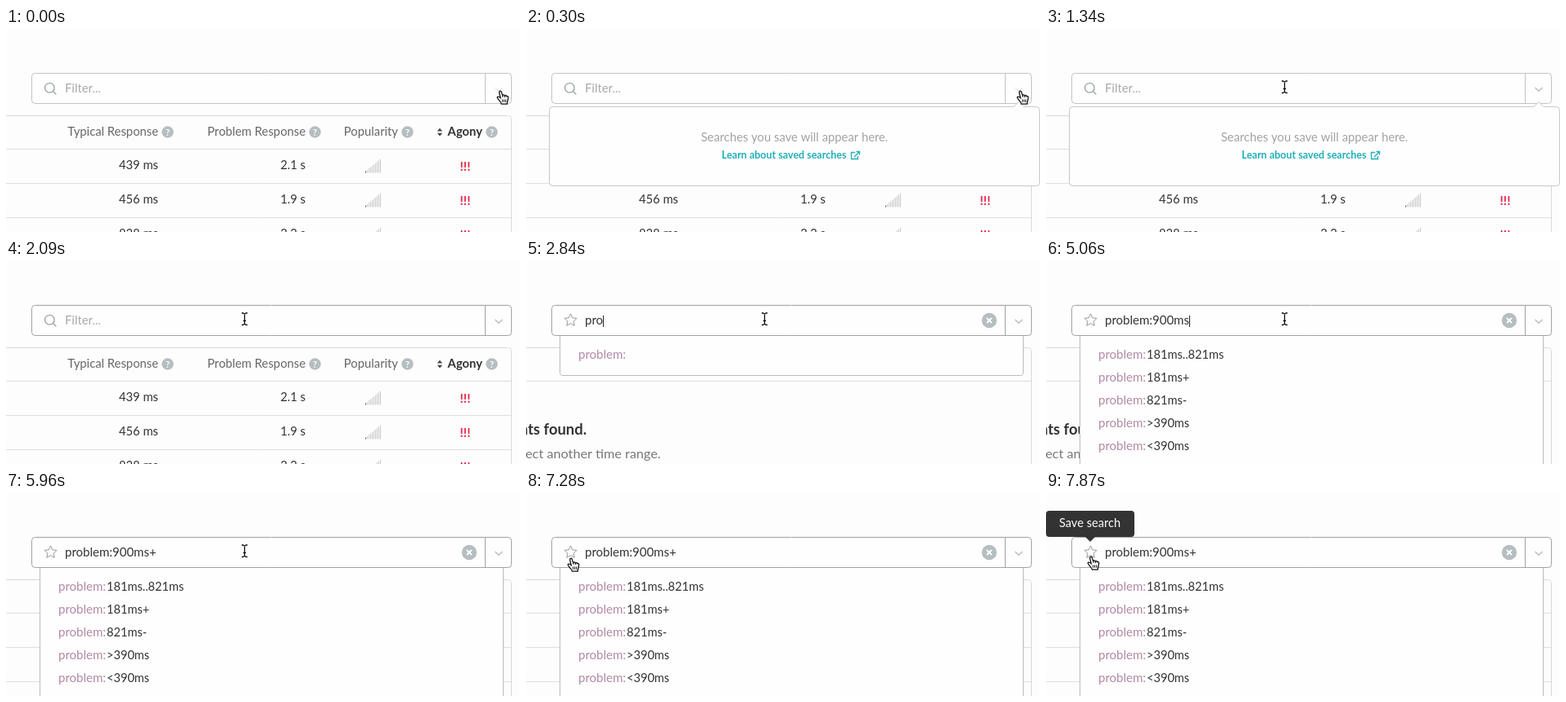
Write an HTML page with a canvas that moves like this. It is 628 px wide and 250 px high and loops after 8 s.

```html
<!DOCTYPE html>
<html lang="en">
<head>
<meta charset="utf-8">
<title>Saved search filter</title>
<style>
html, body { margin: 0; height: 100%; overflow: hidden; background: #fdfdfd; }
canvas { display: block; width: 628px; height: 250px; }
</style>
</head>
<body>
<canvas id="stage"></canvas>
<script>
const LOOP = 8000;
const SIZE = 14.8;
const canvas = document.getElementById('stage');
const ctx = canvas.getContext('2d');
const scale = window.devicePixelRatio || 1;
canvas.width = 628 * scale;
canvas.height = 250 * scale;

// Each track holds [start time, value...]; a value stays until the next start.
const typed = [[0, ''], [2840, 'pro'], [2980, 'prob'], [3130, 'proble'], [3280, 'problem'],
  [3430, 'problem:'], [4170, 'problem:9'], [4320, 'problem:90'], [4470, 'problem:900'],
  [4770, 'problem:900m'], [5060, 'problem:900ms'], [5360, 'problem:900ms+']];
const caret = [[0, 0], [1490, 1], [2090, 0], [2840, 1], [5960, 0], [6410, 1], [7000, 0], [7430, 1], [7870, 0]];
const table = [[0, 'full'], [2840, 'none'], [4170, 'single'], [4470, 'none'], [5360, 'rows']];
const popover = [[0, 0], [300, 1], [1490, 0.5], [1640, 0]];
const tooltip = [[0, 0], [7430, 0.5], [7580, 1]];
const pointer = [[0, 605, 76, 'hand'], [890, 540, 78, 'beam'], [1040, 400, 74, 'beam'],
  [1190, 310, 72, 'beam'], [1340, 291.5, 72, 'beam'],
  [6260, 283, 69, 'beam'], [6410, 248, 60, 'beam'], [6560, 182, 45, 'arrow'], [6700, 116, 42, 'arrow'],
  [6850, 78, 66, 'beam'], [7000, 62, 81, 'hand'], [7130, 57, 84, 'hand'], [7280, 56, 80, 'hand'],
  [7430, 56, 78, 'hand']];

const current = (track, t) => track.filter(key => key[0] <= t).pop().slice(1);

function text(str, x, y, { color = '#333', size = SIZE, weight = 400, align = 'left' } = {}) {
  ctx.font = `${weight} ${size}px Lato, sans-serif`;
  ctx.textAlign = align;
  ctx.fillStyle = color;
  ctx.fillText(str, x, y);
  return ctx.measureText(str).width;
}

function shape(path, { fill, stroke, width = 1 }) {
  const p = typeof path === 'string' ? new Path2D(path) : path;
  if (fill) { ctx.fillStyle = fill; ctx.fill(p); }
  if (stroke) { ctx.strokeStyle = stroke; ctx.lineWidth = width; ctx.stroke(p); }
}

function circle(x, y, r, style) {
  const p = new Path2D();
  p.arc(x, y, r, 0, Math.PI * 2);
  shape(p, style);
}

function box(x, y, w, h, radius, style) {
  const p = new Path2D();
  p.roundRect(x, y, w, h, radius);
  shape(p, style);
}

function help(x) {
  circle(x, 127.5, 7.2, { fill: '#b5bec0' });
  text('?', x, 131.5, { color: '#fff', size: 11, weight: 700, align: 'center' });
}

function drawHeader() {
  const color = '#666';
  text('Typical Response', 186, 132, { color, align: 'right' });
  text('Problem Response', 366, 132, { color, align: 'right' });
  text('Popularity', 479, 132, { color, align: 'right' });
  text('Agony', 582, 132, { weight: 700, align: 'right' });
  shape('M526.8 126.5L530 122.8L533.2 126.5ZM526.8 128.8L530 132.5L533.2 128.8Z', { fill: '#444' });
  [197.5, 377.5, 490.5, 593.5].forEach(help);
}

function drawRow(typical, problem, top) {
  text(typical, 186, top + 25, { align: 'right' });
  text(problem, 366, top + 25, { align: 'right' });
  for (let i = 0; i < 10; i++) {
    const height = 2 + 1.65 * i;
    ctx.fillStyle = i < 1 ? '#555' : '#c8c8c8';
    ctx.fillRect(439 + 2 * i, top + 29.5 - height, 1, height);
  }
  text('!!!', 561, top + 27, { color: '#e5294b', size: 15.5, weight: 700, align: 'center' });
}

function drawTable(mode) {
  const bottom = mode === 'single' ? 190.5 : 260;
  const lines = { full: [148.5, 190.5, 232.5], rows: [148.5, 190.5, 232.5], single: [148.5], none: [148.5] }[mode];
  box(-10, 107.5, 627.5, bottom - 107.5, 4, { stroke: '#d9d9d9' });
  lines.forEach(y => shape(`M0 ${y}H617`, { stroke: '#dedede' }));
  if (mode === 'full') {
    drawHeader();
    drawRow('439 ms', '2.1 s', 148);
    drawRow('456 ms', '1.9 s', 190);
    drawRow('828 ms', '2.2 s', 232);
  } else if (mode === 'none') {
    text('No events found.', 74, 214, { size: 18.4, weight: 700, align: 'right' });
    text('Please select another time range.', 164.5, 243, { size: 16.2, color: '#777', align: 'right' });
  }
}

function drawStar() {
  const p = new Path2D();
  for (let i = 0; i < 10; i++) {
    const r = i % 2 ? 3.8 : 8;
    const angle = i * Math.PI / 5;
    p.lineTo(54.5 + r * Math.sin(angle), 73.9 - r * Math.cos(angle));
  }
  p.closePath();
  shape(p, { stroke: '#999' });
}

function drawInput(value, focused, caretOn, hovered) {
  const border = focused ? '#a2a2a2' : '#c0c4c4';
  box(31.5, 55.5, 586, 37, 4, { fill: '#fefefe', stroke: border });
  shape('M585.5 56V92', { stroke: border });
  shape('M597.5 73L602 77.5L606.5 73', { stroke: hovered ? '#e4e6e6' : '#b0b5b5', width: 1.1 });
  let width = 0;
  if (value) {
    drawStar();
    width = text(value, 72, 79, { size: 15 });
    circle(566, 74, 9.2, { fill: '#b5bec0' });
    shape('M563 71L569 77M569 71L563 77', { stroke: '#fff', width: 1.8 });
  } else {
    circle(53.3, 73.3, 5.8, { stroke: '#929999', width: 1.2 });
    shape('M57.5 77.5L61.3 81.3', { stroke: '#929999', width: 1.2 });
    text('Filter...', 72, 79, { color: '#aaa' });
  }
  if (caretOn) {
    ctx.fillStyle = '#222';
    ctx.fillRect(Math.round(72 + width), 68, 1, 14);
  }
}

function drawSuggestions(value) {
  if (!value) return;
  const expanded = value.includes(':');
  const options = expanded ? ['181ms..821ms', '181ms+', '821ms-', '>390ms', '<390ms'] : [''];
  box(41.5, 92.5, 566, expanded ? 170 : 49, [0, 0, 3, 3], { fill: '#fefefe', stroke: '#bcbcbc' });
  shape('M41 92.5H608', { stroke: '#a2a2a2' });
  options.forEach((option, i) => {
    const y = 121 + 28 * i;
    const width = text('problem:', 64, y, { color: '#b28aa5', size: 15 });
    text(option, 65 + width, y, { size: 14.6 });
  });
}

function drawPopover(alpha) {
  ctx.globalAlpha = alpha;
  shape('M32.5 96.5H596L602 90.5L608 96.5H623.5Q627.5 96.5 627.5 100.5V189.5Q627.5 193.5 623.5 193.5H32.5Q28.5 193.5 28.5 189.5V100.5Q28.5 96.5 32.5 96.5Z',
    { fill: '#fefefe', stroke: '#c5c9c9' });
  text('Searches you save will appear here.', 328, 139, { color: '#a3a3a3', align: 'center' });
  text('Learn about saved searches', 239, 160, { color: '#20afb8', size: 12.5, weight: 700 });
  shape('M402 152.5H397.5V160.5H405.5V157M403.5 151.5H407.5V155.5M407 152L401 158', { stroke: '#20afb8', width: 1.3 });
  ctx.globalAlpha = 1;
}

function drawTooltip(alpha) {
  ctx.globalAlpha = alpha;
  box(0, 23, 108, 32, 4, { fill: '#333' });
  shape('M48 55H60L54 61Z', { fill: '#333' });
  text('Save search', 53.5, 43, { color: '#fff', size: 14.6, align: 'center' });
  ctx.globalAlpha = 1;
}

const cursors = {
  hand() {
    ctx.translate(-6, 0);
    shape('M5.2 9.6L3.6 3.1C3.2 1.2 5.7 .5 6.3 2.4L7.6 6.6C8.3 5.6 10 5.8 10.3 7C11.2 6.2 12.5 6.6 12.7 7.8C13.8 7.2 14.7 8 14.6 9.3C14.7 12 13.2 13.6 13.2 17.2H6.4C6.2 15.2 4.2 13.8 2.9 11.8C1.7 10.2 .5 9.2 1.3 8.4C2.3 7.5 3.8 8.4 5.2 9.6Z',
      { fill: '#fff', stroke: '#111', width: 1.3 });
    shape('M7.6 6.6L8.2 9M10.3 7L10.7 9.2M7.6 11.5V14.8M9.6 11.5V14.8M11.6 11.5V14.8', { stroke: '#111' });
  },
  beam() {
    const path = 'M-3.5 -7H-1.8L0 -5.8L1.8 -7H3.5M0 -6V6.5M-3.5 7.5H-1.8L0 6.3L1.8 7.5H3.5M-1.7 2.5H1.7';
    shape(path, { stroke: '#fff', width: 2.8 });
    shape(path, { stroke: '#111', width: 1.3 });
  },
  arrow() {
    shape('M0 0V14.5L3.4 11.3L5.6 16.4L8 15.4L5.8 10.4H10.4Z', { fill: '#111', stroke: '#fff' });
  }
};

function drawPointer([x, y, kind]) {
  ctx.save();
  ctx.translate(x, y);
  cursors[kind]();
  ctx.restore();
}

function draw(t) {
  const [value] = current(typed, t);
  const [caretOn] = current(caret, t);
  ctx.setTransform(scale, 0, 0, scale, 0, 0);
  ctx.fillStyle = '#fdfdfd';
  ctx.fillRect(0, 0, 628, 250);
  drawTable(current(table, t)[0]);
  drawInput(value, t >= 1490, caretOn, t < 890);
  drawSuggestions(value);
  drawPopover(current(popover, t)[0]);
  drawTooltip(current(tooltip, t)[0]);
  drawPointer(current(pointer, t));
}

const start = performance.now();
function tick() {
  draw((performance.now() - start) % LOOP);
  requestAnimationFrame(tick);
}
tick();
</script>
</body>
</html>
```
